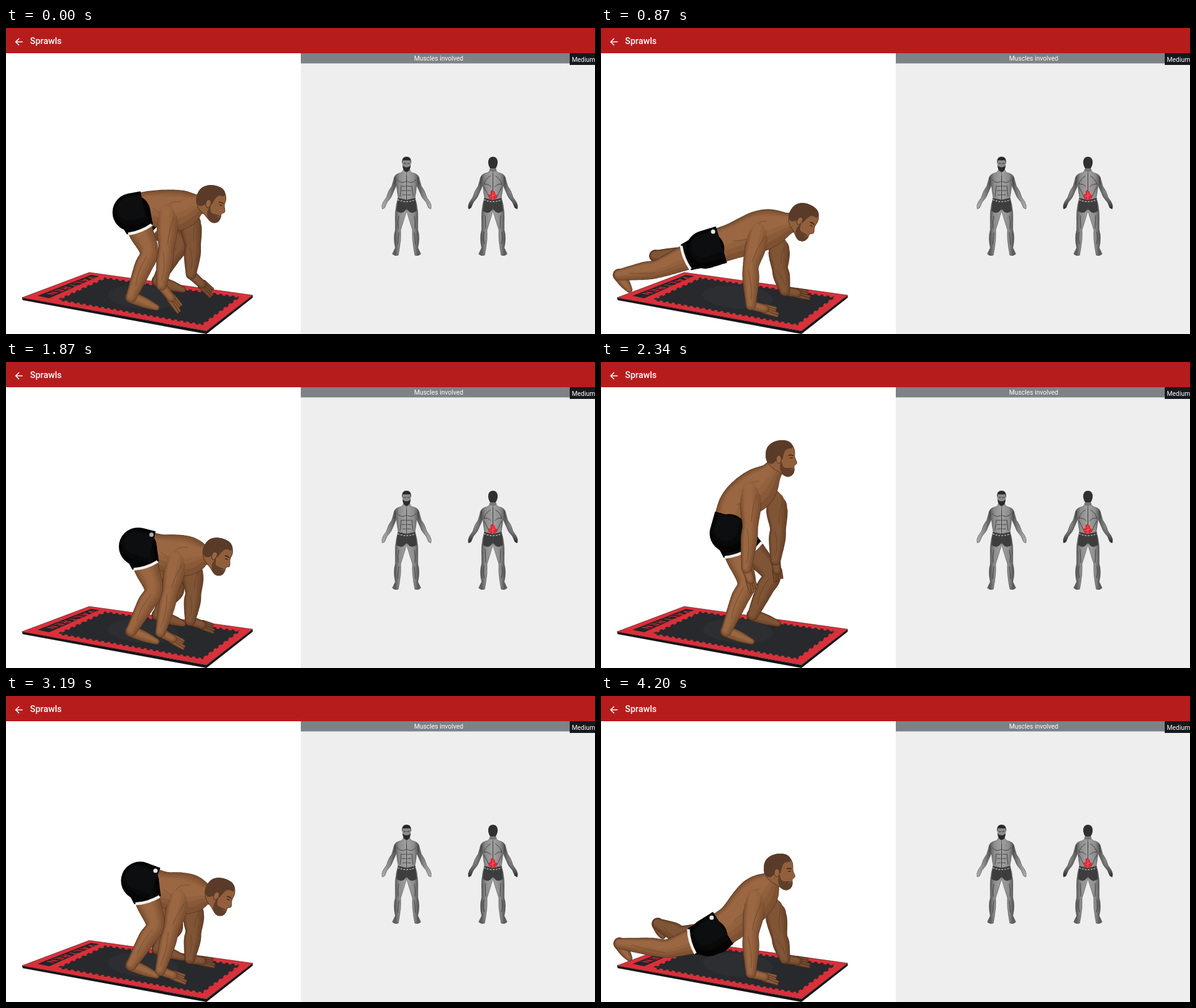
Animation of 955x497 px, one loop 4.26 s. Source, as an HTML page with a canvas:

```html
<!DOCTYPE html>
<html lang="en">
<head>
<meta charset="utf-8">
<title>Sprawls</title>
<style>
  html, body { margin: 0; width: 100%; height: 100%; overflow: hidden; background: #fff; }
  svg, canvas { position: absolute; left: 0; top: 0; }
  text { font: 10.4px Roboto, sans-serif; fill: #fff; }
</style>
</head>
<body>
<svg width="955" height="497" viewBox="0 0 955 497">
  <defs>
    <linearGradient id="grey" x1="0" x2="1">
      <stop offset="0" stop-color="#a2a2a2"/>
      <stop offset=".3" stop-color="#8c8c8c"/>
      <stop offset=".47" stop-color="#585858"/>
      <stop offset=".7" stop-color="#888"/>
      <stop offset="1" stop-color="#b0b0b0"/>
    </linearGradient>
    <linearGradient id="arm" x1="0" y1="0" x2="0" y2="1">
      <stop offset=".2" stop-color="#555" stop-opacity="0"/>
      <stop offset="1" stop-color="#222"/>
    </linearGradient>
    <path id="limbs" d="M0 228L5 229Q6 235 13 236Q21 238 22 247L25 257Q31 264 34 275L39 282Q43 288 41 294L37 292L33 283Q25 275 23 268L17 255Q16 266 14 276L17 286Q20 301 19 315L19 328Q23 340 19 357L24 367Q20 371 14 369L12 358Q9 342 10 328Q5 313 1 300L0 296Z"/>
    <path id="forearm" d="M25 257Q31 264 34 275L39 282Q43 288 41 294L37 292L33 283Q25 275 23 268L20 260Z"/>
    <path id="trunks" d="M0 279L15 276L17 297Q11 302 5 299L0 294Z"/>
    <g id="man">
      <g fill="url(#grey)" stroke="#444" stroke-width=".6">
        <use href="#limbs"/><use href="#limbs" transform="scale(-1 1)"/>
      </g>
      <g fill="#3d3d3d"><use href="#trunks"/><use href="#trunks" transform="scale(-1 1)"/></g>
      <path d="M-15 279Q0 285 15 279" fill="none" stroke="#aaa" stroke-width="1.6" stroke-dasharray="3 2"/>
    </g>
    <path id="frontLines" d="M0 240V279M1 249Q9 254 16 246M1 257H8M1 264H8M1 271H7M9 256L11 274M13 305Q16 316 14 326M13 332L15 352M19 243Q18 250 21 254"/>
    <path id="backLines" d="M0 236V276M4 240Q13 245 15 254Q9 252 3 258M15 258Q10 267 6 276M13 304L12 326M15 331Q18 342 14 351M19 242L21 254"/>
  </defs>

  <rect x="478" y="41" width="477" height="456" fill="#eee"/>
  <rect x="478" y="41" width="477" height="16.5" fill="#7d8287"/>
  <text x="701.5" y="53" text-anchor="middle">Muscles involved</text>
  <rect x="914" y="41" width="41" height="19" fill="#17181b"/>
  <text x="917.5" y="55">Medium</text>
  <rect width="955" height="41" fill="#b71c1c"/>
  <path d="M27 22.500H16.500M21.300 17L15.800 22.500L21.300 28" fill="none" stroke="#fff" stroke-width="1.6"/>
  <text x="39" y="25.5" style="font-size:14.4px;font-weight:500">Sprawls</text>

  <g transform="translate(649.5 0) scale(.96 1)">
    <use href="#man"/>
    <g fill="none" stroke="#3a3a3a" stroke-width=".9">
      <use href="#frontLines"/><use href="#frontLines" transform="scale(-1 1)"/>
    </g>
    <ellipse cy="221" rx="7" ry="11" fill="#8c8c8c"/>
    <path d="M-7.500 221Q-9 209 0 209Q9 209 7.500 221L6 215H-6Z" fill="#2a2a2a"/>
    <path d="M-7 223Q-4 227 0 226Q4 227 7 223Q6 233 0 234Q-6 233 -7 223Z" fill="#2a2a2a"/>
    <path d="M-5 220H-1M1 220H5M-2 229H2" stroke="#333"/>
  </g>
  <g transform="translate(789.5 0) scale(.96 1)">
    <use href="#man"/>
    <g fill="url(#arm)"><use href="#forearm"/><use href="#forearm" transform="scale(-1 1)"/></g>
    <g fill="none" stroke="#3a3a3a" stroke-width=".9">
      <use href="#backLines"/><use href="#backLines" transform="scale(-1 1)"/>
    </g>
    <path d="M-5 222H5V233H-5Z" fill="#777"/>
    <path d="M-8 219Q-8 209 0 209Q8 209 8 219Q7 226 4 228H-4Q-7 226 -8 219Z" fill="#303030"/>
    <path d="M-1 263L3 266L4 270L8 272L5 277L1 279L-6 277L-8 271L-4 270L-4 265Z" fill="#e32632"/>
    <path d="M0 266V279M-5 274L4 271" stroke="#f47a7a" stroke-width=".8"/>
  </g>

  <path d="M26 438L27 442L325 497L400 438V434L325 492Z" fill="#151517"/>
  <path d="M26 438L135 397L400 434L325 491.500Z" fill="#d9303a" stroke="#6d1a20" stroke-width=".7"/>
  <path d="M51 435L138 401L151 403L70 439Z" fill="#252427"/>
  <text transform="matrix(-.93 .36 -.99 -.16 139 403)" style="font:bold 16px Roboto,sans-serif;letter-spacing:2px;fill:#c92c36">VALTREN</text>
  <path d="M81 442L161 405L381 436.500L318 483Z" fill="#27292c"/>
  <path d="M81 442L161 405L381 436.500L318 483Z" fill="none" stroke="#d9303a" stroke-width="4" stroke-dasharray="5 5"/>
  <ellipse cx="222" cy="437" rx="57" ry="19" transform="rotate(4 222 437)" fill="#2c2e31"/>
</svg>
<canvas id="stage" width="478" height="497"></canvas>

<script>
const ctx = document.getElementById('stage').getContext('2d');

const SKIN = ['#573620', '#7e5132', '#895938', '#92613e', '#9a6742'];
const SHADE = ['#4a2d1b', '#6d452b', '#764c30', '#805536'];
const CLOTH = ['#000', '#040404', '#090909', '#0d0e0f'];

// Capitals are the near side. P pelvis, M waist, C chest, N neck, D head;
// S E W H shoulder to fingertips; K A T knee, ankle, toes.
const NAMES = [...'PMCNDSEWHsewhKATkat'];
const PLANTED = { badge: 1, W: [243, 450], H: [287, 462], w: [298, 427], h: [338, 434] };
const STANDING = { badge: 0, A: [203, 437], T: [244, 454], a: [246, 411], t: [287, 425] };

const crouch = { ...STANDING, tilt: 15,
  P: [206, 299], M: [238, 293], C: [278, 296], N: [306, 288], D: [332, 285],
  S: [263, 300], E: [260, 358], W: [252, 418], H: [283, 458],
  s: [298, 305], e: [303, 352], w: [300, 400], h: [335, 432],
  K: [232, 364], k: [280, 350] };
const handsDown = { ...STANDING, ...PLANTED, tilt: 25,
  P: [220, 301], M: [255, 314], C: [293, 321], N: [320, 322], D: [345, 325],
  S: [282, 327], E: [268, 378], W: [250, 446], H: [292, 461],
  s: [304, 342], e: [304, 382], K: [242, 372], k: [272, 372] };
const kick = { ...PLANTED, tilt: 50,
  P: [205, 302], M: [240, 312], C: [280, 324], N: [312, 330], D: [336, 338],
  S: [268, 337], E: [250, 388], s: [295, 350], e: [296, 390],
  K: [185, 375], A: [120, 400], T: [140, 420], k: [215, 375], a: [165, 398], t: [185, 414] };
const landing = { ...PLANTED, tilt: 65,
  P: [182, 315], M: [225, 322], C: [270, 327], N: [306, 334], D: [330, 343],
  S: [256, 340], E: [238, 394], s: [288, 354], e: [288, 394],
  K: [112, 371], A: [48, 402], T: [62, 424], k: [140, 373], a: [110, 390], t: [126, 402] };
const highPlank = { ...PLANTED, tilt: 75,
  P: [168, 328], M: [215, 329], C: [264, 328], N: [302, 336], D: [328, 345],
  S: [251, 342], E: [236, 395], s: [284, 356], e: [286, 394],
  K: [93, 368], A: [36, 403], T: [46, 425], k: [135, 362], a: [97, 379], t: [110, 394] };
const plank = { ...PLANTED, tilt: 30,
  P: [172, 359], M: [214, 346], C: [263, 328], N: [300, 318], D: [326, 314],
  S: [257, 330], E: [243, 386], s: [288, 348], e: [290, 390],
  K: [92, 391], A: [29, 401], T: [46, 425], k: [135, 372], a: [88, 370], t: [98, 384] };
const cobra = { ...PLANTED, tilt: 0,
  P: [177, 390], M: [215, 366], C: [251, 328], N: [272, 304], D: [289, 286],
  S: [251, 328], E: [243, 386], s: [281, 340], e: [289, 390],
  K: [108, 410], A: [30, 402], T: [46, 426], k: [130, 388], a: [92, 370], t: [100, 390] };
const pike = { ...PLANTED, tilt: 78,
  P: [180, 324], M: [220, 322], C: [266, 330], N: [302, 338], D: [328, 347],
  S: [251, 346], E: [238, 395], s: [285, 360], e: [287, 395],
  K: [113, 364], A: [50, 389], T: [66, 413], k: [142, 370], a: [70, 394], t: [70, 411] };
const rise = { ...STANDING, tilt: 0,
  P: [208, 275], M: [220, 232], C: [250, 208], N: [274, 182], D: [292, 157],
  S: [243, 208], E: [242, 265], W: [236, 335], H: [248, 372],
  s: [284, 222], e: [287, 270], w: [283, 322], h: [288, 355],
  K: [236, 358], k: [276, 345] };
const stand = { ...STANDING, tilt: -5,
  P: [222, 250], M: [217, 205], C: [220, 160], N: [228, 130], D: [236, 100],
  S: [212, 160], E: [210, 220], W: [218, 282], H: [226, 312],
  s: [250, 165], e: [256, 220], w: [254, 280], h: [256, 310],
  K: [230, 345], k: [256, 335] };

const CYCLE = 40;
const KEYS = [[0, crouch], [1, handsDown], [5, kick], [7, landing], [9, highPlank],
  [11, plank], [14, cobra], [18, pike], [21, kick], [23, handsDown], [27, crouch],
  [30, rise], [33, stand], [37, rise], [CYCLE, crouch]];

const mix = (a, b, f) => a + (b - a) * f;
const between = (p, q, f) => [mix(p[0], q[0], f), mix(p[1], q[1], f)];

function poseAt(step) {
  const n = KEYS.findIndex(k => k[0] > step);
  const [t0, from] = KEYS[n - 1], [t1, to] = KEYS[n];
  const f = (step - t0) / (t1 - t0);
  const pose = { tilt: mix(from.tilt, to.tilt, f), badge: mix(from.badge, to.badge, f) };
  for (const j of NAMES) pose[j] = between(from[j], to[j], f);
  return pose;
}

const spline = (a, b, c, d, f) =>
  b + f / 2 * (c - a + f * (2 * a - 5 * b + 4 * c - d + f * (3 * (b - c) + d - a)));

// A rounded tube through points with radii, shaded from rim to highlight.
// The rim leaves out the first spots, so that the start can melt into the body.
function tube(points, radii, tones, melt = 0) {
  const nodes = points.map((p, i) => [...p, radii[i]]);
  const at = i => nodes[Math.max(0, Math.min(nodes.length - 1, i))];
  const spots = [];
  for (let i = 0; i < nodes.length - 1; i++)
    for (let f = 0; f <= 1; f += 1 / 14)
      spots.push([0, 1, 2].map(c => spline(at(i - 1)[c], at(i)[c], at(i + 1)[c], at(i + 2)[c], f)));
  tones.forEach((tone, j) => {
    const inset = Math.max(0, j - 1);
    ctx.fillStyle = tone;
    ctx.beginPath();
    for (const [x, y, r] of spots.slice(Math.max(0, melt - 4 * j))) {
      const size = Math.max(.5, r * (1 - .19 * inset) - (j ? .8 : 0));
      const cx = x - r * .07 * inset, cy = y - r * .09 * inset;
      ctx.moveTo(cx + size, cy);
      ctx.arc(cx, cy, size, 0, 7);
    }
    ctx.fill();
  });
}

// Draws only on the side of p that faces q.
function facing(p, q, draw) {
  const a = Math.atan2(q[1] - p[1], q[0] - p[0]);
  ctx.save();
  ctx.translate(...p);
  ctx.rotate(a);
  ctx.beginPath();
  ctx.rect(0, -300, 600, 600);
  ctx.clip();
  ctx.rotate(-a);
  ctx.translate(-p[0], -p[1]);
  draw();
  ctx.restore();
}

function line(width, color, from, bend, to) {
  ctx.lineWidth = width;
  ctx.strokeStyle = color;
  ctx.beginPath();
  ctx.moveTo(...from);
  ctx.quadraticCurveTo(...bend, ...to);
  ctx.stroke();
}
const crease = (...points) => line(1, 'rgba(70,40,20,.4)', ...points);

function arm(s, e, w, h, tones) {
  const palm = between(w, h, .5);
  const len = Math.hypot(h[0] - w[0], h[1] - w[1]) || 1;
  const nx = (w[1] - h[1]) / len, ny = (h[0] - w[0]) / len;
  for (const k of [-1.5, -.5, .5, 1.5]) {
    const tip = between(w, h, k < 0 ? .88 : 1);
    tube([[palm[0] + nx * k * 3, palm[1] + ny * k * 3], [tip[0] + nx * k * 4, tip[1] + ny * k * 4]],
      [3.6, 2.3], tones.slice(0, 3));
  }
  tube([w, palm], [8, 7], tones);
  tube([s, between(s, e, .5), e, between(e, w, .35), w], [18, 17, 13, 13.5, 8.5], tones, 12);
  const bicep = between(s, e, .55), fore = between(e, w, .5);
  crease([s[0] + 9, s[1] + 8], [bicep[0] + 2, bicep[1]], [e[0] + 2, e[1] - 6]);
  crease([e[0] - 5, e[1] + 5], [fore[0] + 3, fore[1]], [w[0], w[1] - 8]);
}

function leg(hip, knee, ankle, toe, waist, girth, tones) {
  const hem = between(hip, knee, .43);
  tube([ankle, between(ankle, toe, .55), toe], [10, 8.5, 5], tones);
  facing(hem, knee, () => {
    tube([hip, between(hip, knee, .5), knee, between(knee, ankle, .35), ankle],
      [23, 20, 15, 14.5, 9], tones);
    const calf = between(knee, ankle, .4);
    crease([knee[0] - 4, knee[1] + 7], [calf[0] - 8, calf[1] + 4], between(knee, ankle, .75));
  });
  facing(hem, hip, () => {
    tube([hip, between(hip, knee, .6)], [girth - 3, 20], CLOTH);
    facing(between(hip, waist, .55), hip, () => tube([waist, hip, hip], [girth, girth, girth], CLOTH));
  });
  const dx = knee[0] - hip[0], dy = knee[1] - hip[1], d = Math.hypot(dx, dy) || 1;
  const edge = side => [hem[0] - dy / d * 20.5 * side, hem[1] + dx / d * 20.5 * side];
  const bow = [hem[0] + dx / d * 5, hem[1] + dy / d * 5];
  line(4.5, '#f4f2f0', edge(-1), bow, edge(1));
}

function blob(color, points, outline) {
  ctx.beginPath();
  points.forEach((p, i) => {
    const mid = between(p, points[(i + 1) % points.length], .5);
    if (!i) ctx.moveTo(...between(points.at(-1), p, .5));
    ctx.quadraticCurveTo(...p, ...mid);
  });
  ctx.fillStyle = color;
  ctx.fill();
  if (outline) {
    ctx.lineWidth = 1;
    ctx.strokeStyle = outline;
    ctx.stroke();
  }
}

function head(center, tilt) {
  ctx.save();
  ctx.translate(...center);
  ctx.rotate(tilt * Math.PI / 180);
  blob('#925f3d', [[-15, 16], [-25, 2], [-24, -19], [-8, -30], [14, -29], [23, -14], [21, -3],
    [27, 8], [20, 11], [22, 18], [19, 27], [8, 30], [-4, 20]], SKIN[0]);
  blob('#5a3b29', [[-17, 10], [-26, 2], [-24, -20], [-8, -30], [14, -30], [21, -16], [9, -17],
    [4, -8], [2, 4], [-4, -2], [-9, 5]]);
  blob('#5f3e2a', [[0, 0], [3, 15], [12, 15], [22, 15], [20, 27], [8, 31], [-3, 19]]);
  blob('#9a6641', [[-8, -4], [-1, -6], [1, 3], [-3, 9], [-8, 5]], SKIN[0]);
  line(1.6, '#3b2416', [12, -5], [15, -7], [20, -5]);
  line(1.3, '#3b2416', [14, -1], [16, -2], [19, -1]);
  line(1.2, '#8f5549', [15, 18], [18, 17], [20, 18]);
  ctx.restore();
}

// The plain mark at the back of the waistband.
function badge(pelvis, waist, alpha) {
  const dx = waist[0] - pelvis[0], dy = waist[1] - pelvis[1], d = Math.hypot(dx, dy);
  const [x, y] = between(pelvis, waist, .4);
  ctx.globalAlpha = alpha;
  ctx.fillStyle = '#e8e4e0';
  ctx.beginPath();
  ctx.arc(x + dy / d * 24, y - dx / d * 24, 3.5, 0, 7);
  ctx.fill();
  ctx.globalAlpha = 1;
}

function draw(b) {
  ctx.clearRect(0, 0, 478, 497);
  const farHip = [b.P[0] + 13, b.P[1] + 1];
  leg(farHip, b.k, b.a, b.t, b.M, 25, SHADE);
  arm(b.s, b.e, b.w, b.h, SHADE);
  tube([b.P, b.M, b.C, b.N, b.D], [28, 29, 33, 18, 13], SKIN);
  const rib = between(b.M, b.C, .5);
  crease(b.M, [rib[0] - 6, rib[1] + 8], [b.C[0] - 6, b.C[1] + 12]);
  crease(rib, [b.C[0] - 14, b.C[1] - 16], [b.C[0] + 6, b.C[1] - 14]);
  leg(b.P, b.K, b.A, b.T, b.M, 31, SKIN);
  badge(b.P, b.M, b.badge);
  head(b.D, b.tilt);
  arm(b.S, b.E, b.W, b.H, SKIN);
}

const LOOP = 4260, STEP = 77.7;
let shown = -1;
function tick(now) {
  const step = Math.floor((now % LOOP + 10) / STEP);
  if (step !== shown) draw(poseAt(step % CYCLE));
  shown = step;
  requestAnimationFrame(tick);
}
tick(performance.now());
</script>
</body>
</html>
```
